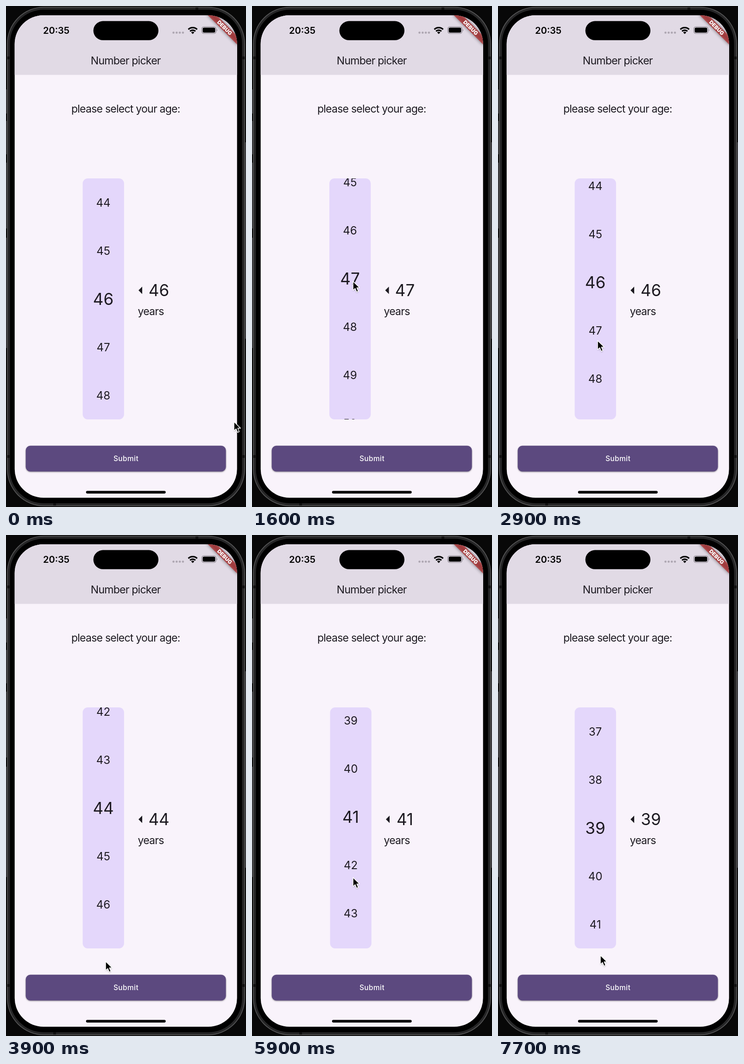
These frames come from a looping animation (518 by 1081 pixels, 7800 ms). An HTML page:

```html
<!DOCTYPE html>
<html lang="en">
<head>
<meta charset="utf-8">
<title>Number picker</title>
<style>
  html, body { margin: 0; width: 100%; height: 100%; overflow: hidden; background: #050505; }
  svg { display: block; width: 518px; height: 1081px; }
  text { font-family: Inter, sans-serif; fill: #1d1a21; }
  .mid { text-anchor: middle; }
  .label { font-size: 23px; letter-spacing: -.75px; }
  .num { font-size: 24px; }
  .big { font-size: 35px; }
</style>
</head>
<body>
<svg viewBox="0 0 518 1081">
  <defs>
    <clipPath id="screen"><rect x="18.7" y="20" width="480" height="1041" rx="62"/></clipPath>
    <clipPath id="panel"><rect x="165.5" y="372" width="89.3" height="520" rx="11"/></clipPath>
    <filter id="soft" x="-20%" y="-40%" width="140%" height="180%"><feGaussianBlur stdDeviation="1.4"/></filter>
    <filter id="glow" x="-20%" y="-150%" width="140%" height="400%"><feGaussianBlur stdDeviation="3.8"/></filter>
  </defs>

  <!-- phone body -->
  <rect width="518" height="1081" fill="#080808"/>
  <g fill="#3b3b3e">
    <rect y="180" width="2" height="52"/>
    <rect y="248" width="2" height="72"/>
    <rect y="338" width="2" height="142"/>
    <rect y="500" width="2" height="238"/>
    <rect x="516" y="294" width="2" height="424"/>
  </g>
  <rect x="3" y="2.5" width="512" height="1076" rx="79" fill="#262627" stroke="#59595a" stroke-width="1.5"/>
  <rect x="8.5" y="8" width="501" height="1065" rx="73" fill="#000"/>
  <path d="M412 3v5M105 1073v5M3 112h5M510 112h5M3 972h5M510 972h5" stroke="#111" stroke-width="6"/>

  <g clip-path="url(#screen)">
    <rect x="18" y="20" width="482" height="1041" fill="#f9f3fb"/>
    <rect x="18" y="20" width="482" height="128.6" fill="#e1dae5"/>

    <g transform="translate(498.7 20) rotate(45)">
      <rect x="-46" y="31.2" width="92" height="13.4" fill="#000" opacity=".5" filter="url(#glow)"/>
      <rect x="-46" y="31.2" width="92" height="13.4" fill="#b71c1c" opacity=".63"/>
      <text class="mid" y="42" font-size="11.4" font-weight="900" style="fill:#fff">DEBUG</text>
    </g>
  </g>

  <!-- status bar -->
  <text class="mid" x="108.5" y="60" font-size="20" font-weight="600" style="fill:#000">20:35</text>
  <rect x="188.6" y="32.6" width="140.4" height="41.2" rx="20.6"/>
  <g fill="#ada6b1">
    <circle cx="361.5" cy="57.5" r="2.3"/><circle cx="368.3" cy="57.5" r="2.3"/>
    <circle cx="375.1" cy="57.5" r="2.3"/><circle cx="381.9" cy="57.5" r="2.3"/>
  </g>
  <g fill="none" stroke="#000" stroke-width="3.2">
    <path d="M393.5 50.5a13.6 13.6 0 0 1 19 0M397.2 54.5a8.3 8.3 0 0 1 11.6 0"/>
  </g>
  <path d="M403 60.5l-3.4-3.6a5 5 0 0 1 6.8 0z"/>
  <rect x="422.5" y="44.5" width="31" height="15" rx="5" fill="none" stroke="#8c8690" stroke-width="1.2"/>
  <rect x="424.5" y="46.5" width="27" height="11" rx="3.2"/>
  <path d="M455 49.5q2.4 2.6 0 5.2z" fill="#8c8690"/>

  <text class="mid label" x="258.3" y="126">Number picker</text>
  <text class="mid label" x="258.3" y="229.5">please select your age:</text>

  <g id="wheel">
    <rect x="165.5" y="372" width="89.3" height="520" rx="11" fill="#e4d7fb"/>
    <g id="list" clip-path="url(#panel)"></g>
    <path d="M286 613.5l8-8v16z" fill="#1d1a21"/>
  </g>
  <text id="value" class="mid big" x="330" y="626"></text>
  <text class="label" x="284.5" y="666.5">years</text>

  <rect x="42.6" y="950" width="432" height="55.4" rx="10" opacity=".42" filter="url(#soft)"/>
  <rect x="42.6" y="948.8" width="432" height="55.6" rx="10" fill="#5c497f"/>
  <text class="mid" x="259" y="982" font-size="15.3" font-weight="500" letter-spacing=".5" style="fill:#fff">Submit</text>
  <rect x="172.7" y="1046.3" width="172" height="5.6" rx="2.8"/>

  <g id="cursor">
    <path d="M0 0V19.5L4.6 15.4L7.8 23L11.4 21.5L8.2 14H14.3Z" opacity=".35" filter="url(#soft)" transform="translate(0 1.5)"/>
    <path d="M0 0V19.5L4.6 15.4L7.8 23L11.4 21.5L8.2 14H14.3Z" stroke="#fff" stroke-width="1.5" stroke-linejoin="round"/>
  </g>
</svg>
<script>
  const LOOP = 7800, STEP = 100, ROW = 104.1, CENTER = 632;
  const $ = id => document.getElementById(id);

  const linear = k => k;
  const smooth = k => k * k * (3 - 2 * k);
  const settle = k => 1 - (1 - k) ** 3;

  // [time, x, y, easing towards this point]
  const pointer = [
    [0, 492, 897], [600, 220, 760, smooth], [700, 220, 760], [1600, 218, 594],
    [1900, 217, 532, settle], [2000, 217, 534], [2900, 215, 722], [3900, 215, 920],
    [4100, 215, 926, settle], [4600, 207, 493, smooth], [4800, 208, 432, settle],
    [5900, 218, 739], [6700, 221, 907, settle]
  ];
  // [time, position, easing towards this point]
  const scroll = [
    [0, 46], [800, 46], [1600, 47.42], [2000, 48, settle],
    [2100, 47.9], [2900, 46.345], [3900, 44.41], [4000, 44.37], [4400, 44, settle],
    [4900, 44], [5900, 41.225], [6700, 39.55, settle], [6800, 39.5], [7400, 39, settle]
  ];

  function sample(track, t) {
    const i = track.findIndex(key => key[0] > t);
    if (i < 0) return track[track.length - 1].slice(1);
    const a = track[i - 1], b = track[i];
    const ease = b.find(v => typeof v === "function") || linear;
    const k = ease((t - a[0]) / (b[0] - a[0]));
    return a.slice(1).filter(v => typeof v === "number").map((v, j) => v + (b[j + 1] - v) * k);
  }

  const rows = Array.from({ length: 7 }, () => {
    const row = document.createElementNS("http://www.w3.org/2000/svg", "text");
    row.setAttribute("x", 210);
    $("list").append(row);
    return row;
  });

  // Narrow digits pull the centred row inwards.
  const inset = n => ({ 1: 3, 7: 1.5 })[n % 10] || 0;

  function draw(now) {
    const t = Math.floor(now % LOOP / STEP) * STEP;
    const [x, y] = sample(pointer, t);
    const [pos] = sample(scroll, t);
    const picked = Math.round(pos);

    rows.forEach((row, i) => {
      const n = picked + i - 3, big = n === picked;
      row.textContent = n;
      row.setAttribute("class", big ? "mid big" : "mid num");
      row.setAttribute("y", CENTER + (n - pos) * ROW + (big ? 12.7 : 8.7));
    });
    $("value").textContent = picked;
    $("wheel").setAttribute("transform", `translate(${inset(picked)} 0)`);
    $("cursor").setAttribute("transform", `translate(${x} ${y})`);
    requestAnimationFrame(draw);
  }
  requestAnimationFrame(draw);
</script>
</body>
</html>
```
